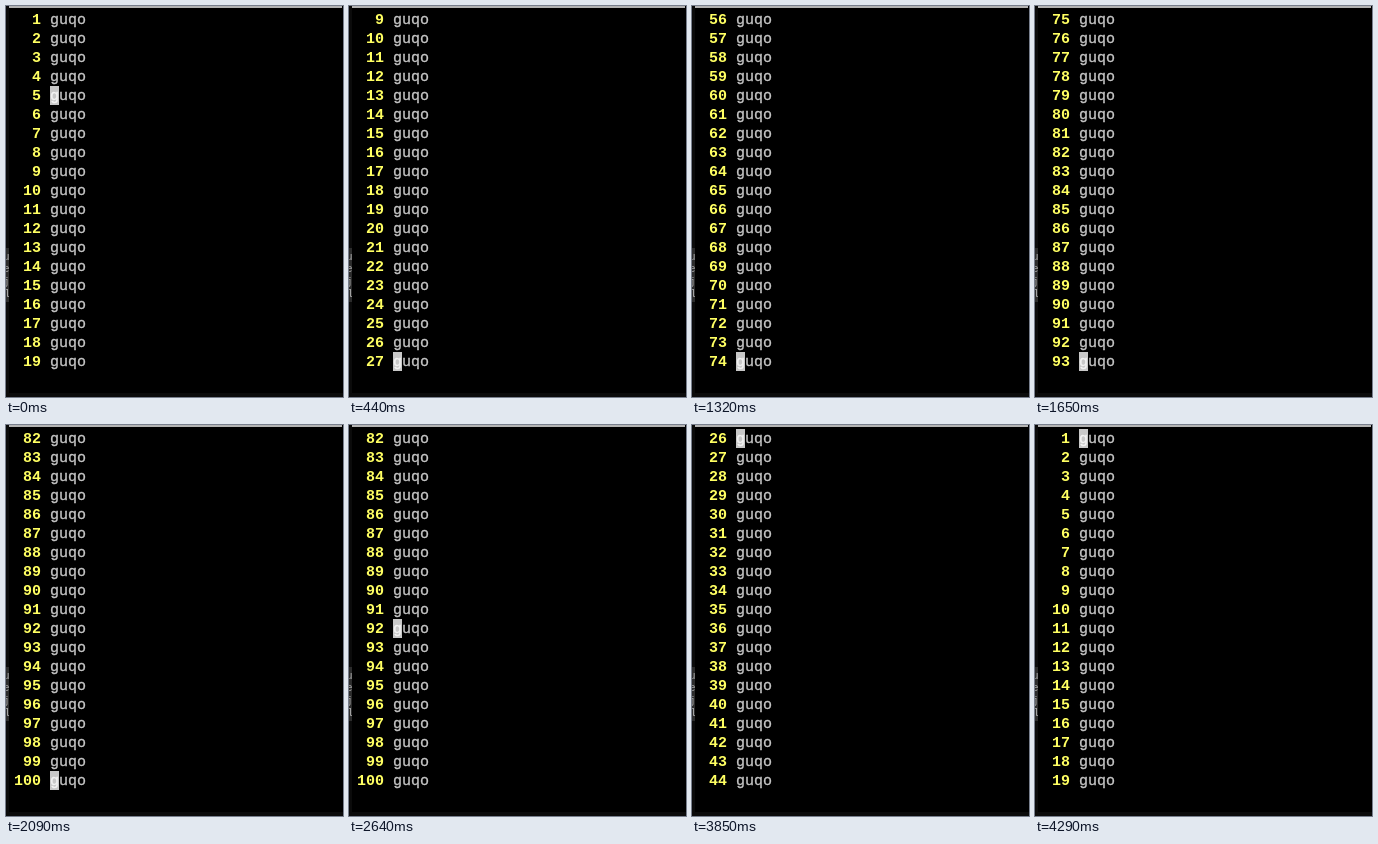
Animation, 337 px wide and 391 px high, one loop 4.4 s. Source, as an HTML page:

```html
<!DOCTYPE html>
<html lang="en">
<head>
<meta charset="utf-8">
<title>Scrolling a numbered file</title>
<style>
  html, body { margin: 0; width: 100%; height: 100%; overflow: hidden; background: #000; }
  svg { display: block; width: 337px; height: 391px; }
  text { font: 15px "Liberation Mono", monospace; fill: #c6c6c6; }
  .word { stroke: #c6c6c6; stroke-width: .35px; }
  .num { font-weight: bold; fill: #ffff62; text-anchor: end; }
  .lit { fill: #f4f4f4; stroke: #f4f4f4; }
  .edge { width: 3px; }
  .edge text { font-size: 11px; fill: #a8a8a8; }
</style>
</head>
<body>
<svg viewBox="0 0 337 391">
  <rect width="337" height="391" fill="#0b0b0b"/>
  <svg class="edge" width="3" height="391">
    <rect y="242" width="3" height="54" fill="#2c2c2c"/>
    <text x="-3" y="254">u</text>
    <text x="-3" y="266">e</text>
    <text x="-3" y="279">j</text>
    <text x="-2" y="291">l</text>
  </svg>
  <rect x="3" width="334" height="387" fill="#000"/>
  <rect x="3" width="333" height="2" fill="#b4b4b4"/>
  <rect id="cursor" x="44" width="9" height="19" fill="#c8c8c8"/>
  <g id="rows"></g>
</svg>
<script>
const WORD = 'guqo', ROWS = 19, PITCH = 19, LAST = 100, STEP = 110, STEPS = 40;
// [step, cursor line]
const KEYS = [[0, 5], [8, 48], [15, 93], [16, 99], [17, 100], [22, 100],
              [23, 98], [24, 92], [29, 62], [35, 26], [39, 1]];
const rows = document.getElementById('rows');
const cursor = document.getElementById('cursor');

function add(parent, tag, attrs, content = '') {
  const el = document.createElementNS('http://www.w3.org/2000/svg', tag);
  for (const name in attrs) el.setAttribute(name, attrs[name]);
  el.textContent = content;
  return parent.appendChild(el);
}

const lines = Array.from({ length: ROWS }, (_, i) => {
  const y = 18 + i * PITCH;
  const num = add(rows, 'text', { x: 35, y, class: 'num' });
  const word = add(rows, 'text', { x: 44, y, class: 'word' });
  const first = add(word, 'tspan', {}, WORD[0]);
  word.append(WORD.slice(1));
  return { num, first };
});

function lineAt(step) {
  const i = KEYS.findIndex(([s]) => s >= step);
  if (i === 0) return KEYS[0][1];
  const [s0, a] = KEYS[i - 1], [s1, b] = KEYS[i];
  return Math.round(a + (b - a) * (step - s0) / (s1 - s0));
}

function draw() {
  const step = Math.floor(performance.now() / STEP) % STEPS;
  const line = lineAt(step);
  // The view moves only when the cursor pushes against its edge.
  const top = step < 20 ? Math.max(1, line - ROWS + 1) : Math.min(LAST - ROWS + 1, line);
  lines.forEach(({ num, first }, i) => {
    num.textContent = top + i;
    first.setAttribute('class', top + i === line ? 'lit' : '');
  });
  cursor.setAttribute('y', 4 + (line - top) * PITCH);
  requestAnimationFrame(draw);
}
draw();
</script>
</body>
</html>
```
